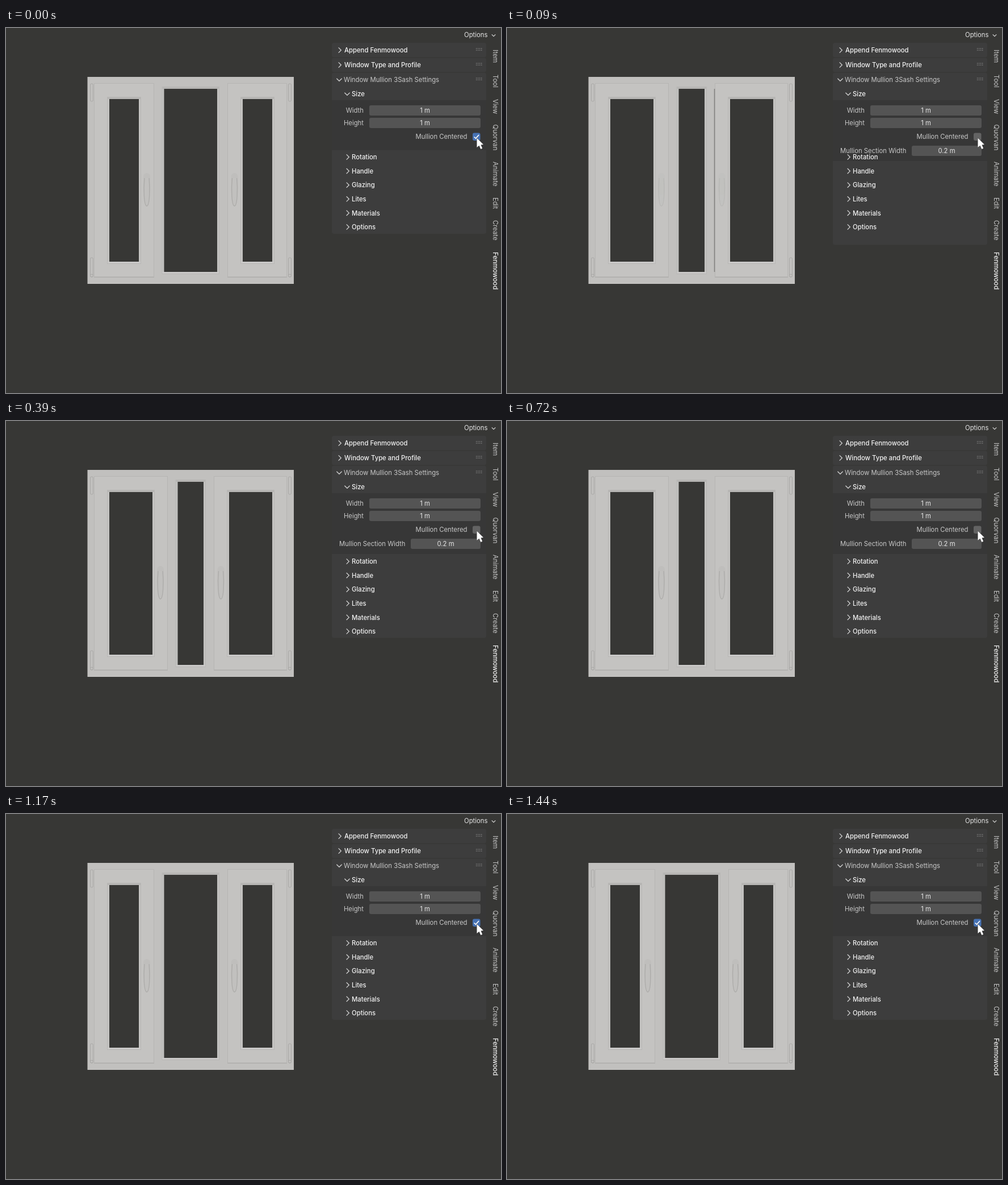
An HTML page with a canvas for the animation above (1.68 s loop, 872 px wide and 642 px high).

```html
<!DOCTYPE html>
<html lang="en">
<head>
<meta charset="utf-8">
<title>Window settings</title>
<style>
html, body { margin: 0; width: 100%; height: 100%; overflow: hidden; background: #373735; }
canvas { display: block; }
</style>
</head>
<body>
<canvas id="stage" width="872" height="642"></canvas>
<script>
const g = document.getElementById('stage').getContext('2d');
const LOOP = 1680, OPEN = 90, SETTLED = 120, CLOSE = 1170;
const DARK = '#373735', PANEL = '#3d3d3d', LIGHT = '#f2f2f2', DIM = '#c8c8c8';

function box(x, y, w, h, fill, r = 0) {
  g.fillStyle = fill;
  g.beginPath();
  g.roundRect(x, y, w, h, r);
  g.fill();
}

function line(points, color, width = 1) {
  g.strokeStyle = color;
  g.lineWidth = width;
  g.beginPath();
  points.forEach(([x, y], i) => i ? g.lineTo(x, y) : g.moveTo(x, y));
  g.stroke();
}

function text(str, x, y, color = LIGHT, align = 'left') {
  g.font = `${color === LIGHT ? 500 : 400} 11.3px Inter, sans-serif`;
  g.fillStyle = color;
  g.textAlign = align;
  g.fillText(str, x, Math.round(y + 4.2));
}

function chevron(x, y, open, s = 4.6) {
  const p = open ? [[-s, -s / 2], [0, s / 2], [s, -s / 2]] : [[-s / 2, -s], [s / 2, 0], [-s / 2, s]];
  line(p.map(([a, b]) => [x + a, y + b]), '#d0d0d0', 1.3);
}

function grip(y) {
  for (let i = 0; i < 8; i++) box(828 + i % 4 * 3, y - 3 + (i >> 2) * 3, 1.3, 1.3, '#929292');
}

function field(x, y, value) {
  box(x, y - 9, 836 - x, 18, '#545454', 3);
  text(value, (x + 836) / 2, y, '#e6e6e6', 'center');
}

// Dark pane with its bevelled bead
function glass(x1, x2, y1, y2) {
  g.lineWidth = 1;
  g.strokeStyle = '#b8b7b5';
  g.strokeRect(x1 - 3.5, y1 - 3.5, x2 - x1 + 7, y2 - y1 + 7);
  box(x1 - 3, y1 - 3, x2 - x1 + 6, 3, '#b6b5b3');
  box(x1 - 3, y2, x2 - x1 + 6, 2.5, '#cbcac9');
  box(x1, y1, x2 - x1, y2 - y1, DARK);
}

function sash(x1, x2) {
  box(x1, 97, x2 - x1, 341, '#c4c3c1');
  g.lineWidth = 1;
  g.strokeStyle = '#b6b5b3';
  g.strokeRect(x1 + .5, 97.5, x2 - x1 - 1, 340);
  box(x1, 438, x2 - x1, 1, '#b0afad');
}

function hinge(x, y, h) {
  g.lineWidth = 1;
  g.strokeStyle = '#a9a8a6';
  g.beginPath();
  g.roundRect(x - 2.5, y, 5, h, 2);
  g.stroke();
}

function handle(x, alpha) {
  g.save();
  g.globalAlpha = alpha;
  box(x - 6, 255, 12, 38, '#bfbebc', 6);
  g.fillStyle = '#c1c0be';
  g.strokeStyle = '#adacaa';
  g.lineWidth = 1.4;
  g.beginPath();
  g.moveTo(x - 4, 264);
  g.bezierCurveTo(x - 6, 284, x - 5, 313, x, 313);
  g.bezierCurveTo(x + 5, 313, x + 6, 284, x + 4, 264);
  g.fill();
  g.stroke();
  g.restore();
}

function drawWindow(off, fresh) {
  const s = off ? 24 : 0;
  box(143.5, 86, 363.5, 364, '#c1c0be');
  line([[144, 449.5], [507, 449.5]], '#cbcac8');
  sash(155, 261 + s);
  sash(390 - s, 495);
  glass(182, 234 + s, 125, 411);
  glass(417 - s, 469, 125, 411);
  glass(278.5 + s, 372 - s, 107, 429);
  for (const x of [151, 500]) {
    hinge(x, 98, 31);
    hinge(x, 404, 34);
    g.beginPath();
    g.arc(x, 435.5, 2.5, 0, 7);
    g.stroke();
  }
  const alpha = fresh ? .4 : 1;
  handle(248 + s, alpha);
  handle(402.5 - s, alpha);
  if (fresh) line([[365.5, 107], [365.5, 429]], '#82817f', 1.5);
}

function drawPanel(off, fresh) {
  text('Options', 807, 12, '#e6e6e6');
  chevron(859, 13, true, 3.3);

  box(574, 26, 272, 25.5, PANEL, 4);
  box(574, 52.5, 272, 25, PANEL, 4);
  box(574, 78.5, 272, off ? 303 : 283.5, PANEL, 4);
  box(574, 127, 272, off ? 107 : 87.5, '#373737');

  chevron(588, 39, false);
  text('Append Fenmowood', 596, 39);
  chevron(588, 65, false);
  text('Window Type and Profile', 596, 65);
  chevron(587, 91, true);
  text('Window Mullion 3Sash Settings', 595, 91, DIM);
  [38.5, 64.5, 90.5].forEach(grip);
  chevron(601, 116, true);
  text('Size', 609, 115.5);

  text('Width', 630, 145, DIM, 'right');
  field(640, 145, '1 m');
  text('Height', 630, 167, DIM, 'right');
  field(640, 167, '1 m');
  text('Mullion Centered', 812.5, 191, DIM, 'right');
  box(822, 184.5, 13.5, 13.5, off ? '#636363' : '#4772b3', 3);
  if (off) {
    text('Mullion Section Width', 703.5, 216, DIM, 'right');
    field(713, 216, '0.2 m');
  } else {
    line([[824.7, 191.5], [827.5, 194.3], [833, 188]], '#fff', 1.7);
  }

  const top = off && !fresh ? 247 : 227;
  ['Rotation', 'Handle', 'Glazing', 'Lites', 'Materials', 'Options'].forEach((name, i) => {
    const y = top + i * 24.6;
    chevron(602, y, false);
    text(name, 609, y);
  });
}

function drawTabs() {
  const tabs = [['Item', 38], ['Tool', 82], ['View', 125], ['Quorvan', 169.5], ['Animate', 235],
    ['Edit', 298], ['Create', 338], ['Fenmowood', 394]];
  tabs.forEach(([name, y], i) => {
    g.save();
    g.translate(861.5, y);
    g.rotate(Math.PI / 2);
    text(name, 0, 0, i === 7 ? LIGHT : DIM);
    g.restore();
  });
}

function drawCursor() {
  const p = [[829.5, 193.5], [829.5, 210], [833.5, 206.7], [836.3, 213], [839.2, 211.7], [836.5, 205.5], [841, 205]];
  g.beginPath();
  p.forEach(([x, y]) => g.lineTo(x, y));
  g.closePath();
  g.strokeStyle = '#333';
  g.lineWidth = 1;
  g.stroke();
  g.fillStyle = '#fff';
  g.fill();
}

const start = performance.now();
function draw() {
  const t = (performance.now() - start) % LOOP;
  const off = t >= OPEN && t < CLOSE;
  const fresh = off && t < SETTLED;
  box(0, 0, 872, 642, DARK);
  drawWindow(off, fresh);
  drawPanel(off, fresh);
  drawTabs();
  drawCursor();
  requestAnimationFrame(draw);
}
draw();
</script>
</body>
</html>
```
